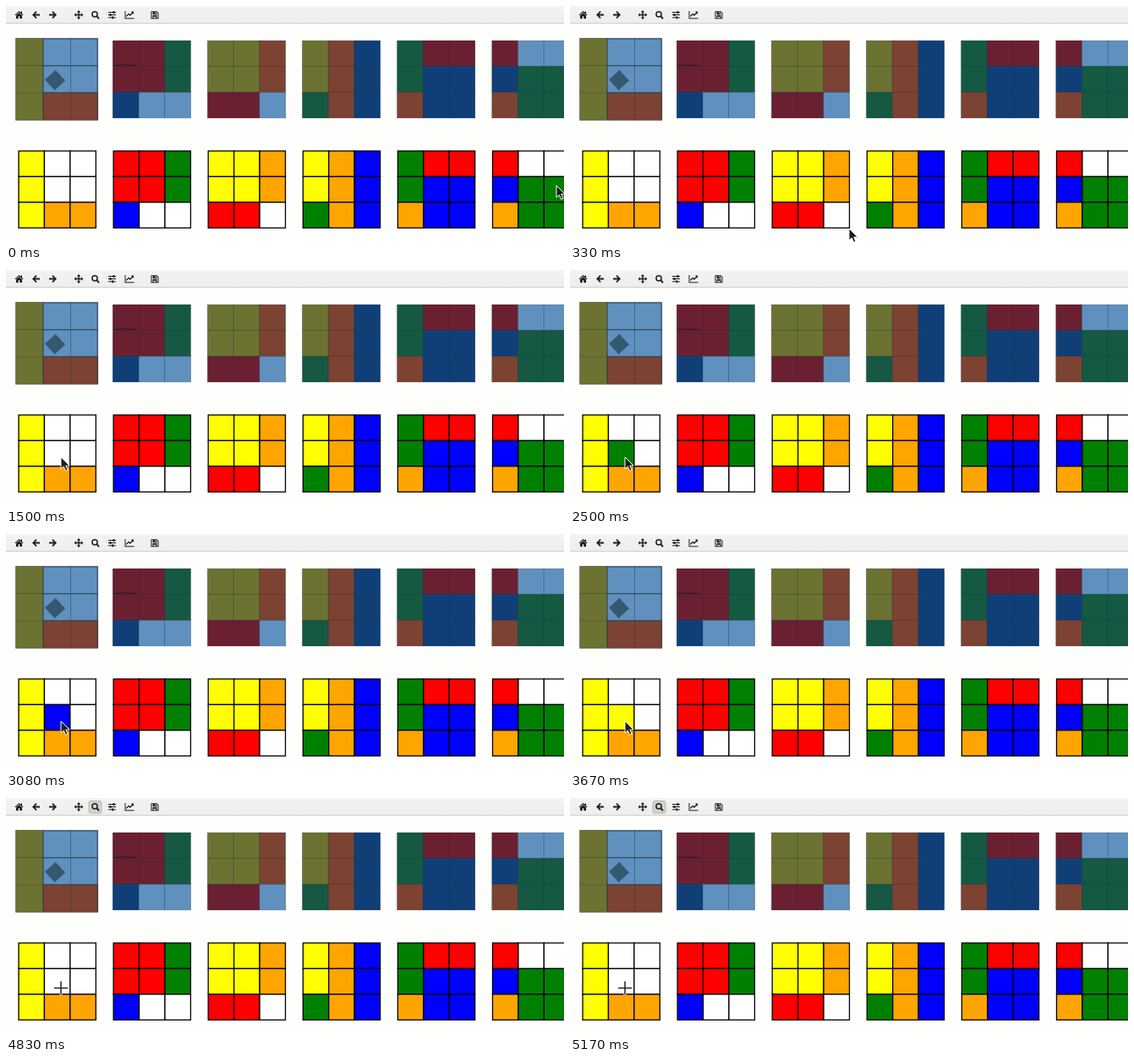
Recreate the animation shown at these times as an HTML page. Size 660x280 px, loop 5260 ms.

```html
<!DOCTYPE html>
<html>
<head>
<meta charset="utf-8">
<style>
  html, body { margin: 0; width: 100%; height: 100%; overflow: hidden; background: #fefefd; }
  svg { display: block; width: 660px; height: 280px; }
</style>
</head>
<body>
<svg viewBox="0 0 660 280">
  <defs>
    <linearGradient id="bar" x1="0" y1="0" x2="0" y2="1">
      <stop offset="0" stop-color="#f4f3f2"/><stop offset="1" stop-color="#eeedeb"/>
    </linearGradient>
  </defs>
  <rect width="660" height="280" fill="#fefefd"/>
  <rect width="660" height="20.5" fill="url(#bar)"/>
  <rect y="20" width="660" height="1" fill="#d2cfcb"/>
  <rect id="zoom" x="98" y="3.5" width="15" height="14.5" rx="2" fill="#d5d2ce" stroke="#b9b5b0"/>
  <g fill="#1c1c1c">
    <path d="M15.5 6L10.5 10.6l.7.7 4.3-3.9 4.3 3.9.7-.7-1.5-1.4V6.6h-1.4v1.2zM12 11.3V15h2.6v-2.7h1.8V15H19v-3.7l-3.5-3.1z"/>
    <path id="arrow" d="M31 10.5l4.5-4.5 1.2 1.2-2.3 2.4H40v1.8h-5.6l2.3 2.4-1.2 1.2z"/>
    <use href="#arrow" transform="matrix(-1 0 0 1 91 0)"/>
    <path d="M86 5l2.2 2.4h-1.5v2.4h2.4V8.3l2.3 2.2-2.3 2.2v-1.5h-2.4v2.4h1.5L86 16l-2.2-2.4h1.5v-2.4h-2.4v1.5l-2.3-2.2 2.3-2.2v1.5h2.4V7.4h-1.5z"/>
    <path d="M121 7h9v1h-9zM121 10.1h9v1h-9zM121 13.2h9v1h-9zM126.5 6h1.8v3h-1.8zM122.6 9.1h1.8v3h-1.8zM125.4 12.2h1.8v3h-1.8z"/>
    <path d="M140.5 6h1v8.3h10v1h-11zM151 6.5v3.2l-1-1-3.2 3.2-1.6-1.6-2.4 2.4-.9-.9 3.3-3.3 1.6 1.6 2.3-2.3-1.2-1.3z"/>
    <path fill-rule="evenodd" d="M171.5 6.2h7l2 2v7h-9zm1 1v7h1v-3.4h5v3.4h1V8.6l-1.2-1.3v2.6h-4.6V7.2zm3.8 0v1.8h1.2V7.2zm-1.8 5.5v1.6h3v-1.6z"/>
  </g>
  <g fill="none" stroke="#1c1c1c">
    <circle cx="105" cy="9.8" r="3.1" stroke-width="1.5"/>
    <path d="M107.3 12.1l2.7 2.9" stroke-width="1.9"/>
  </g>
  <g id="photos"></g>
  <rect x="-8.5" y="-8.5" width="17" height="17" transform="translate(58 88) rotate(-43)" fill="#34586f"/>
  <g id="faces"></g>
  <path id="pointer" d="M0 0V14.2l3.3-3 2.3 5.2 2.5-1.1-2.3-5.1h4.4z" fill="#1d1d1d" stroke="#fff" stroke-width="1" stroke-linejoin="round"/>
  <g id="cross" fill="none">
    <path d="M56.5 225.5h17M65 217v17" stroke="#fff" stroke-width="3"/>
    <path d="M57 225.5h16M65 217.5v16" stroke="#222" stroke-width="1.5"/>
  </g>
</svg>
<script>
const $ = id => document.getElementById(id);
const FACES = ['ywwywwyoo', 'rrgrrgbww', 'yyoyyorrw', 'yobyobgob', 'grrgbbobb', 'rwwbggogg'];
const PAINT = { y: '#ffff00', w: '#ffffff', o: '#ffa500', r: '#ff0000', g: '#008000', b: '#0000ff' };
const PHOTO = { y: '#6c7332', w: '#6090bd', o: '#7d4332', r: '#6a2030', g: '#155943', b: '#103f78' };
const LOOP = 5260, STEP = 1000 / 12, LAST = 62;

// [step, x, y]
const PATH = [[0, 651, 213], [2, 560, 242], [4, 330, 264], [7, 102, 256], [9, 82, 228], [11, 70, 223], [13, 65, 222]];
// [step, colour of the centre cell]
const KEYS = [[0, 'w'], [22, 'r'], [29, 'g'], [35, 'b'], [42, 'y'], [49, 'o'], [56, 'w']];
const ZOOM_ON = 49;

function add(parent, name, attrs) {
  const el = document.createElementNS('http://www.w3.org/2000/svg', name);
  for (const k in attrs) el.setAttribute(k, attrs[k]);
  return parent.appendChild(el);
}

function grid(parent, face, x, y, size, colors, style) {
  const c = size / 3;
  return [...face].map((k, i) => add(parent, 'rect', {
    x: x + i % 3 * c, y: y + Math.floor(i / 3) * c, width: c, height: c, fill: colors[k], ...style
  }));
}

const cells = FACES.map((face, i) => {
  const x = 15 + 112.1 * i, first = i === 0;
  const px = first ? 11.5 : x - 0.7, py = first ? 38 : 41, size = first ? 97.5 : 92;
  add($('photos'), 'rect', { x: px, y: py, width: size, height: size, fill: '#2d4552' });
  grid($('photos'), face, px, py, size, PHOTO, { stroke: '#17303f', 'stroke-opacity': 0.22, 'stroke-width': 0.8 });
  return grid($('faces'), face, x, 172, 91.3, PAINT, { stroke: '#000', 'stroke-width': 1.3 });
});
add($('photos'), 'path', {
  d: 'M44 39H108V134M44 71H108M44 39V134M44 102.7H108', fill: 'none', stroke: '#23394a', 'stroke-width': 1, 'stroke-opacity': 0.75
});
add($('photos'), 'path', { d: 'M127 70.5q14 -1 27 .3', fill: 'none', stroke: '#3a1720', 'stroke-width': 1.2 });

function place(s) {
  const i = PATH.findIndex(p => p[0] > s);
  if (i < 0) return PATH[PATH.length - 1].slice(1);
  const [a, ax, ay] = PATH[i - 1], [b, bx, by] = PATH[i];
  const u = (s - a) / (b - a);
  return [ax + (bx - ax) * u, ay + (by - ay) * u];
}

function draw(ms) {
  const s = Math.min(LAST, Math.floor((ms % LOOP + 5) / STEP));
  const zoom = s >= ZOOM_ON;
  const key = KEYS.filter(k => k[0] <= s).pop()[1];
  cells[0][4].setAttribute('fill', PAINT[key]);
  $('zoom').style.display = $('cross').style.display = zoom ? '' : 'none';
  $('pointer').style.display = zoom ? 'none' : '';
  $('pointer').setAttribute('transform', `translate(${place(s)})`);
}

let start;
function tick(now) {
  if (start === undefined) start = now;
  draw(now - start);
  requestAnimationFrame(tick);
}
draw(0);
requestAnimationFrame(tick);
</script>
</body>
</html>
```
